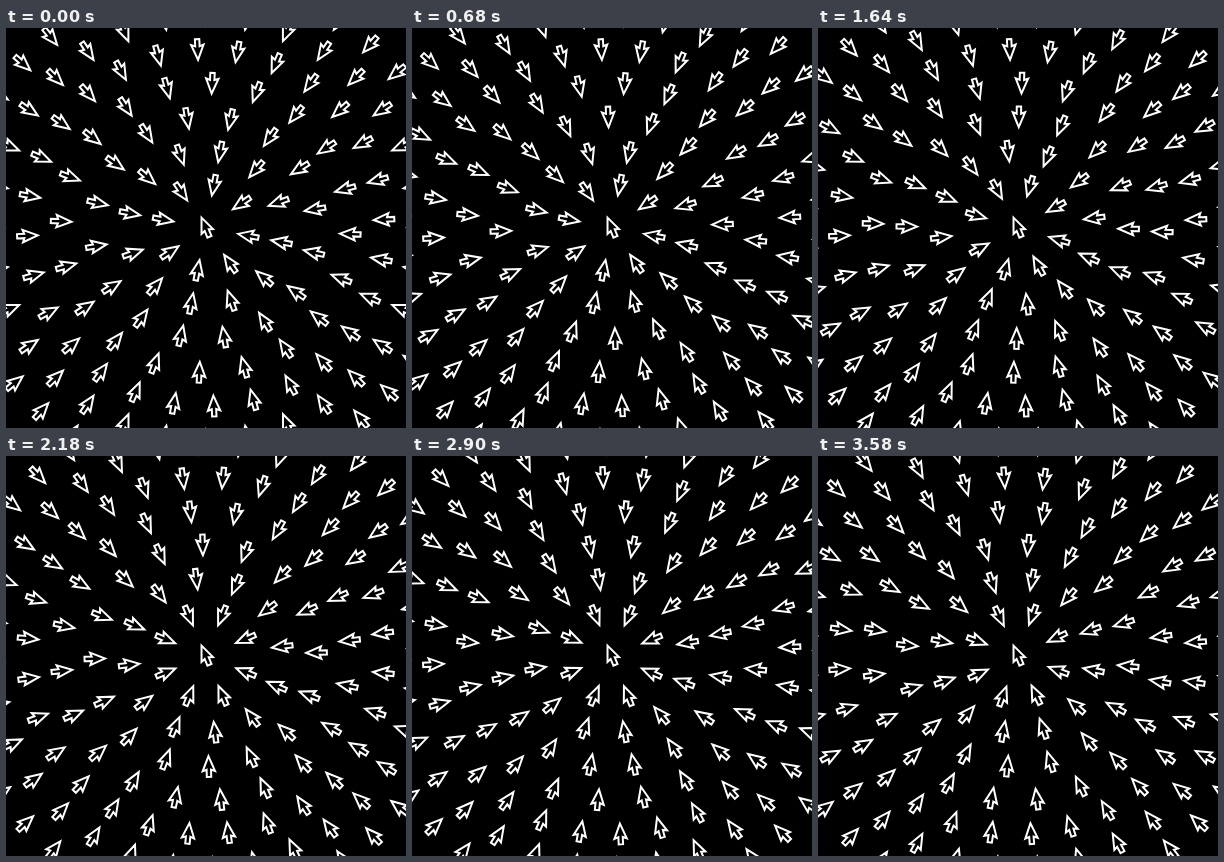
An HTML page with a canvas that plays this animation: 400 by 400 pixels, repeating every 3600 ms.

```html
<!DOCTYPE html>
<html lang="en">
<head>
<meta charset="utf-8">
<title>Pointer rings</title>
<style>
  html, body { margin: 0; width: 100%; height: 100%; overflow: hidden; background: #000; }
  canvas { display: block; width: 400px; height: 400px; }
</style>
</head>
<body>
<canvas id="stage" width="400" height="400"></canvas>
<script>
const ctx = document.getElementById('stage').getContext('2d');
const LOOP = 3600;
const CENTER = 199.7;
const RINGS = 7;
const RAD = Math.PI / 180;

const radius = ring => 43.8 + 33.8 * ring;

// Always a multiple of four, growing a little faster towards the outside.
const count = ring => 4 * (2 + ring + Math.floor(ring * ring / 16));

// One swing travels inward: each ring runs LAG ms ahead of the one inside it.
const LAG = 660;
const TURNS = [
  { ms: 900, deg: 10.8 },
  { ms: 2450, deg: 23.1 },
  { ms: 3080, deg: 23.1 },
  { ms: 4930, deg: 5.4 },
  { ms: 6980, deg: 28.3 },
  { ms: 9000, deg: 8 }
];

const ease = u => (1 - Math.cos(Math.PI * u)) / 2;

function swing(ms) {
  const next = TURNS.findIndex(turn => turn.ms > ms);
  if (next === 0) return TURNS[0].deg;
  const a = TURNS[next - 1];
  const b = TURNS[next];
  return a.deg + (b.deg - a.deg) * ease((ms - a.ms) / (b.ms - a.ms));
}

const pointer = new Path2D('M0-10.9L6.2 4.1L2.2 2.6V9.8H-2.2V2.6L-6.2 4.1Z');

// Draws a pointer at a clockwise angle from the top, turned by `turn` degrees.
function drawPointer(r, angle, turn) {
  ctx.save();
  ctx.translate(CENTER + r * Math.sin(angle * RAD), CENTER - r * Math.cos(angle * RAD));
  ctx.rotate(turn * RAD);
  ctx.stroke(pointer);
  ctx.restore();
}

function draw(now) {
  const t = now % LOOP;
  ctx.fillStyle = '#000';
  ctx.fillRect(0, 0, 400, 400);
  ctx.strokeStyle = '#fff';
  ctx.lineWidth = 2;

  drawPointer(0, 0, -22.5);
  for (let ring = 0; ring < RINGS; ring++) {
    const offset = swing(t + ring * LAG);
    const step = 360 / count(ring);
    for (let i = 0; i < count(ring); i++) {
      const angle = offset + i * step;
      drawPointer(radius(ring), angle, angle + 180);
    }
  }
  requestAnimationFrame(draw);
}

requestAnimationFrame(draw);
</script>
</body>
</html>
```
